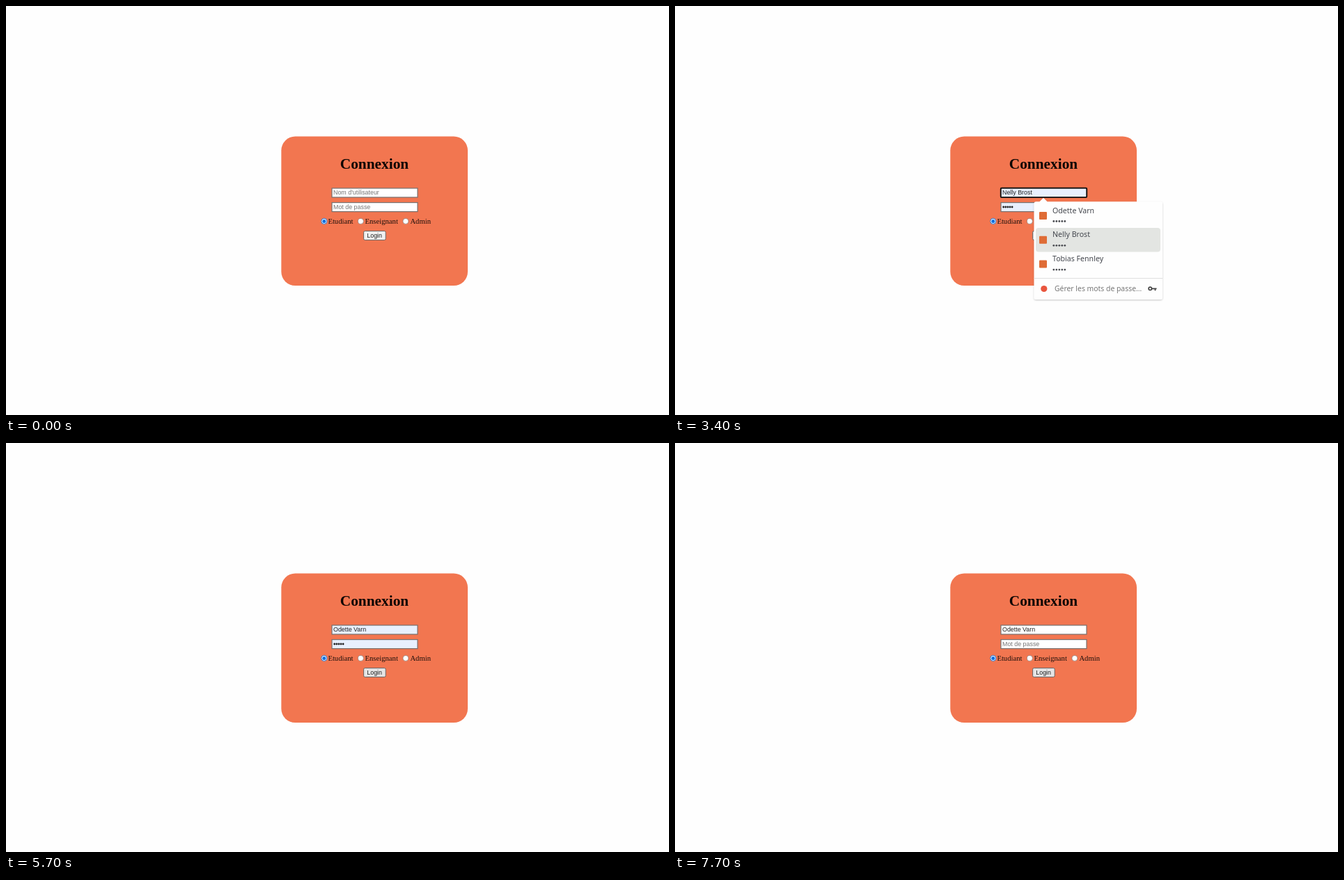
Write an HTML page that moves like this. It is 952 px wide and 588 px high and loops after 8 s.

```html
<!DOCTYPE html>
<html lang="fr">
<head>
<meta charset="utf-8">
<title>Connexion</title>
<style>
  html, body { margin: 0; width: 100%; height: 100%; overflow: hidden; background: #fefefe; }
  svg { display: block; width: 952px; height: 588px; }
  text { white-space: pre; }
  .serif { font: 10.67px "Liberation Serif", serif; fill: #1c0f0b; }
  .title { font: bold 21.33px "Liberation Serif", serif; fill: #0d0503; }
  .ui { font: 8.89px "Liberation Sans", sans-serif; fill: #222; }
  .hint { fill: #757575; }
  .sans { font: 10.6px "Noto Sans", sans-serif; fill: #222; }
  .item { font-weight: 500; fill: #43464d; }
  .foot { font-size: 10.4px; fill: #777; }
  .small { font: 8.5px "Noto Sans", sans-serif; fill: #222; }
  .bold { font-weight: bold; fill: #111; }
  .field { stroke: #77706e; stroke-width: 1.2; }
</style>
</head>
<body>
<svg viewBox="0 0 952 588">
  <defs>
    <filter id="shadow" x="-10%" y="-10%" width="120%" height="120%">
      <feDropShadow dx="0" dy="1" stdDeviation="1.3" flood-color="#000" flood-opacity=".22"/>
    </filter>
  </defs>

  <g id="login">
    <rect x="395.3" y="187.6" width="267.7" height="214.4" rx="20" fill="#f27650"/>
    <text class="title" x="479.8" y="234.3">Connexion</text>

    <rect id="userBox" class="field" x="468" y="262" width="123" height="13"/>
    <rect id="focus" x="467.7" y="261.6" width="123.6" height="13.6" rx="1.5" fill="none" stroke="#14100f" stroke-width="1.8"/>
    <text id="user" class="ui" x="470" y="271.4"></text>
    <path id="caret" d="M0 264v9" stroke="#111" stroke-width=".9"/>

    <rect id="passBox" class="field" x="468" y="282.6" width="123" height="13"/>
    <text id="passHint" class="ui hint" x="470" y="292">Mot de passe</text>
    <g id="passDots" fill="#222"></g>

    <g id="roles"></g>

    <rect id="button" x="513.6" y="323.6" width="31.6" height="12.8" rx="1.8" stroke="#686260" stroke-width="1"/>
    <text class="ui" x="518.3" y="332.8">Login</text>
  </g>

  <g id="menu">
    <path d="M518 281.3h5.5l5.5-5.6 5.5 5.6H697q3 0 3 3V419q0 3-3 3H518.500q-3 0-3-3V284.300q0-3 3-3z" fill="#fefefe" filter="url(#shadow)"/>
    <rect id="hover" x="518" width="179" height="34.600" rx="4" fill="#e3e5e2"/>
    <g id="items"></g>
    <path d="M515.500 391.500H700" stroke="#dfdfdf"/>
    <circle cx="529.800" cy="406.500" r="4.600" fill="#e9553d"/>
    <text class="sans foot" x="545" y="410.300">Gérer les mots de passe…</text>
    <g fill="none" stroke="#444" stroke-width="1.700">
      <circle cx="682.300" cy="406.300" r="2.200"/>
      <path d="M684.500 406.300h7M689.500 406.300v3"/>
    </g>
  </g>

  <g id="schedule">
    <text class="sans bold" x="-1" y="27" style="font-size:20.1px">Emploi du temps</text>
    <rect x="20.500" y="53.500" width="100.500" height="478.500" fill="#e3f8fe"/>
    <text class="sans bold" x="44" y="82" style="font-size:16.1px">Profile</text>
    <text id="profile" class="sans" x="40" y="119.800"></text>
    <text class="sans" x="40" y="142.600">etudiant</text>
    <g id="grid"></g>
  </g>
</svg>

<script>
  const LOOP = 8000;
  const PEOPLE = ['Odette Varn', 'Nelly Brost', 'Tobias Fennley'];
  const $ = id => document.getElementById(id);

  function add(parent, tag, attrs, content = '') {
    const el = document.createElementNS('http://www.w3.org/2000/svg', tag);
    for (const key in attrs) el.setAttribute(key, attrs[key]);
    el.textContent = content;
    parent.append(el);
    return el;
  }

  const label = (parent, cls, x, y, content) => add(parent, 'text', { class: cls, x, y }, content);

  function dots(parent, x, y, gap, r) {
    for (let i = 0; i < 5; i++) add(parent, 'circle', { cx: x + i * gap, cy: y, r });
  }

  function buildLogin() {
    dots($('passDots'), 471.7, 289, 3.1, 1.4);
    [['Etudiant', 456.8, 462.4], ['Enseignant', 509.4, 515.5], ['Admin', 573.9, 580.4]].forEach(([name, cx, x], i) => {
      const cy = 309.4;
      add($('roles'), 'circle', { cx, cy, r: 4, fill: '#fff', stroke: i ? '#8a7771' : '#1a73d9', 'stroke-width': i ? .7 : 1 });
      if (!i) add($('roles'), 'circle', { cx, cy, r: 2.5, fill: '#0b6fe0' });
      label($('roles'), 'serif', x, 313.4, name);
    });
  }

  function buildMenu() {
    PEOPLE.forEach((name, i) => {
      const y = 301.5 + i * 34.8;
      add($('items'), 'rect', { x: 523, y: y - 5.5, width: 11, height: 11, rx: 1, fill: '#df6c36' });
      label($('items'), 'sans item', 542, y - 4, name);
      const row = add($('items'), 'g', { fill: '#4b4d52' });
      dots(row, 543.8, y + 8, 4, 1.4);
    });
  }

  function lesson(x, y, lines) {
    const grid = $('grid');
    add(grid, 'rect', { x, y, width: 124, height: 83.5, rx: 1, fill: '#f8fd9f', stroke: '#f1dfb4', 'stroke-width': .9 });
    lines.forEach((line, i) => label(grid, i ? 'small' : 'small bold', x + 1.8, y + 9.6 + i * 9.3, line));
  }

  function buildSchedule() {
    const grid = $('grid');
    $('profile').textContent = PEOPLE[0];
    ['Lundi', 'Mardi', 'Mercredi', 'Jeudi', 'Vendredi'].forEach((day, i) => {
      const x = 179.8 + i * 137.3;
      add(grid, 'rect', { x, y: 53.5, width: 134, height: 475.5, fill: '#faeef3' });
      add(grid, 'rect', { x, y: 86.8, width: 134, height: 1.2, fill: '#fdf8fa' });
      label(grid, 'sans', x - .5, 63.6, day);
    });
    for (let h = 8; h <= 18; h++) label(grid, 'sans', 160.8, 97.3 + (h - 8) * 40.17, h);
    lesson(320.6, 188.2, ['Anglais - CM', 'E7', PEOPLE[2]]);
    lesson(732.6, 97.5, ['Chimie - TD', 'P100', 'Gaston Brivel']);
  }

  // Last value whose start time has been reached.
  const at = (t, steps) => steps.reduce((value, [start, next]) => t >= start ? next : value, null);
  const within = (t, a, b) => t >= a && t < b;
  const clamp = v => Math.max(0, Math.min(1, v));
  const show = (id, on) => { $(id).style.display = on ? '' : 'none'; };

  function render(t) {
    const onSchedule = within(t, 6000, 7700);
    show('schedule', onSchedule);
    show('login', !onSchedule);

    const row = at(t, [[0, -1], [2600, 0], [2800, 1], [3000, 2], [3300, 1], [3500, 0]]);
    const picked = row >= 0;
    const returned = t >= 7700;
    const filled = picked && !returned;
    $('user').textContent = picked ? PEOPLE[row] : 'Nom d\'utilisateur';
    $('user').classList.toggle('hint', !picked);
    for (const id of ['userBox', 'passBox']) $(id).setAttribute('fill', filled ? '#e8f0fe' : '#fff');
    show('passDots', filled);
    show('passHint', !filled);

    show('focus', within(t, 1400, 5500));
    const chosen = t >= 4400;
    show('caret', within(t, 1400, 2000) || within(t, 2500, 2600) || within(t, 4400, 5200));
    $('caret').setAttribute('transform', `translate(${chosen ? 518.4 : 470.2})`);
    $('button').setAttribute('fill', at(t, [[0, '#f0f0f0'], [5200, '#e5e5e5'], [5500, '#f5f5f5'], [5700, '#e5e5e5']]));

    const opacity = chosen ? clamp(1 - (t - 4500) / 217) : clamp((t - 1400) / 200);
    const scale = 1 - .048 * (1 - opacity);
    show('menu', opacity > 0);
    $('menu').setAttribute('opacity', opacity);
    $('menu').setAttribute('transform', `translate(607.5 352) scale(${scale}) translate(-607.5 -352)`);
    show('hover', picked);
    $('hover').setAttribute('y', 284.2 + Math.max(row, 0) * 34.8);
  }

  buildLogin();
  buildMenu();
  buildSchedule();

  const origin = performance.now();
  function tick() {
    render((performance.now() - origin) % LOOP);
    requestAnimationFrame(tick);
  }
  tick();
</script>
</body>
</html>
```
